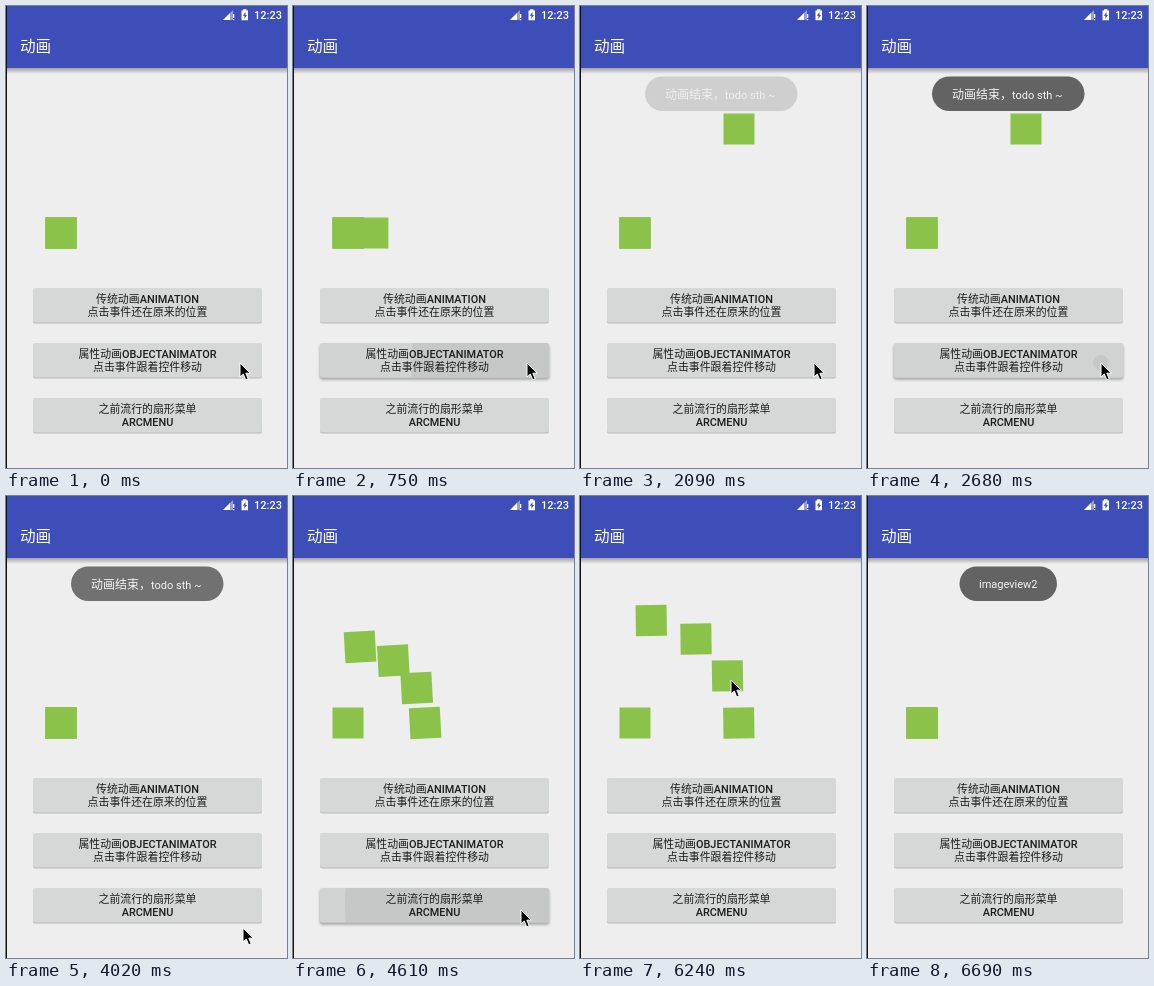
An HTML page for the animation above (7.47 s loop, 281 by 462 pixels).

```html
<!DOCTYPE html>
<html lang="zh">
<head>
<meta charset="utf-8">
<title>动画</title>
<style>
  html, body { margin: 0; width: 100%; height: 100%; overflow: hidden; background: #eee; }
  svg { display: block; width: 281px; height: 462px; }
  text { font-family: Roboto, "Noto Sans CJK SC", "Noto Sans CJK", sans-serif; }
  .label { font-size: 10.9px; text-anchor: middle; fill: #1c1c1c; }
  .label tspan { font-weight: 500; }
  .toast text { font-size: 12px; fill: #f4f4f4; }
  .toast tspan { font-size: 11px; }
  .toast rect { fill: #636363; }
  .item { fill: #8bc34a; }
</style>
</head>
<body>
<svg viewBox="0 0 281 462">
  <defs>
    <linearGradient id="barShadow" x2="0" y2="1">
      <stop stop-color="#000" stop-opacity=".32"/>
      <stop offset="1" stop-color="#000" stop-opacity="0"/>
    </linearGradient>
    <filter id="blur" x="-10%" y="-50%" width="120%" height="200%">
      <feGaussianBlur stdDeviation="1.4"/>
    </filter>
  </defs>
  <rect width="281" height="462" fill="#eee"/>
  <rect y="62" width="281" height="6" fill="url(#barShadow)"/>
  <rect width="281" height="62" fill="#3d4eb8"/>
  <g fill="#fff">
    <path d="M217 14L227 4V14Z" opacity=".45"/>
    <path d="M217 14L224 7V14ZM227 8h1.3v4H227ZM227 13h1.3v1.3H227Z"/>
    <path d="M235.500 4.500H237V3.200H240.500V4.500H242V14.300H235.500Z"/>
    <path d="M239.500 6L236.800 9.700H238.400V12.800L241 9H239.500Z" fill="#3d4eb8"/>
    <text x="248" y="13" font-size="11" font-weight="500">12:23</text>
    <text x="14" y="46" font-size="15.6">动画</text>
  </g>
  <g id="buttons"></g>
  <g id="items"></g>
  <g class="toast" id="endToast">
    <rect x="65" y="70.500" width="152.500" height="34.500" rx="17.250"/>
    <text x="85" y="92.500">动画结束，<tspan>todo sth ~</tspan></text>
  </g>
  <g class="toast" id="itemToast">
    <rect x="92.500" y="70.500" width="97.500" height="34.500" rx="17.250"/>
    <text x="141.250" y="92" text-anchor="middle"><tspan>imageview2</tspan></text>
  </g>
  <path id="cursor" d="M0 0V14L3.300 11L5.700 16.800L8.200 15.700L5.800 10.200H10.300Z"
        fill="#000" stroke="#fff" stroke-width="1"/>
  <rect width="1" height="462" fill="#111"/>
</svg>
<script>
const LOOP = 7470, TICK = 148.7;
const HOME = { x: 55, y: 227 }, RADIUS = 104;
const $ = id => document.getElementById(id);

const labels = [
  ['传统动画ANIMATION', '点击事件还在原来的位置'],
  ['属性动画OBJECTANIMATOR', '点击事件跟着控件移动'],
  ['之前流行的扇形菜单', 'ARCMENU']
];
const presses = [
  { button: 1, down: 440, up: 500, x: 234, y: 357 },
  { button: 1, down: 2660, up: 2940, x: 234, y: 357 },
  { button: 2, down: 4150, up: 4230, x: 228, y: 410 }
];
const cursorPath = [
  [0, 234, 357], [2960, 234, 357], [3500, 238, 446], [4015, 237, 432],
  [4230, 228, 414], [4620, 228, 414], [5200, 208, 333], [5640, 151, 184],
  [6100, 151, 184], [6680, 238, 470]
];

const styled = s => s.replace(/[A-Z]+/g, '<tspan>$&</tspan>');
$('buttons').innerHTML = labels.map(([top, bottom], i) => {
  const y = 282 + 55 * i;
  const box = `x="27" y="${y}" width="229" height="34.500" rx="2"`;
  return `<clipPath id="clip${i}"><rect ${box}/></clipPath>
    <rect class="lift" ${box} transform="translate(0 2)" filter="url(#blur)" opacity="0"/>
    <rect ${box} transform="translate(0 1)" fill="#b9baba"/>
    <rect ${box} fill="#d6d7d7"/>
    <g clip-path="url(#clip${i})">
      <rect class="tint" ${box} opacity="0"/>
      <circle class="ripple" opacity="0"/>
    </g>
    <text class="label" x="141.500" y="${y + 15}">${styled(top)}</text>
    <text class="label" x="141.500" y="${y + 28}">${styled(bottom)}</text>`;
}).join('');
$('items').innerHTML = '<rect class="item" x="-15.500" y="-15.500" width="31" height="31"/>'.repeat(5);

const all = name => [...document.querySelectorAll('.' + name)];
const lifts = all('lift'), tints = all('tint'), ripples = all('ripple'), items = all('item');

const span = (t, start, length) => Math.min(1, Math.max(0, (t - start) / length));
const ease = (t, start, length) => (1 - Math.cos(Math.PI * span(t, start, length))) / 2;

function place(node, x, y, turn = 0) {
  node.setAttribute('transform', `translate(${x} ${y}) rotate(${turn})`);
}

function drawItems(t) {
  const back = 1 - ease(t, 2900, 690);
  const right = ease(t, 519, 690) * back, up = ease(t, 1209, 690) * back;
  const open = ease(t, 4230, 575) - ease(t, 6080, 575);
  items.forEach((item, i) => {
    if (i === 0) return place(item, HOME.x, HOME.y);
    const angle = (i - 1) * Math.PI * 0.15;
    const slides = i === 1 ? RADIUS : 0;
    place(item,
      HOME.x + RADIUS * open * Math.cos(angle) + slides * right,
      HOME.y - RADIUS * open * Math.sin(angle) - slides * up,
      360 * open);
  });
}

function drawPresses(t) {
  [lifts, tints, ripples].flat().forEach(node => node.setAttribute('opacity', 0));
  for (const { button, down, up, x, y } of presses) {
    if (t < down || t > up + 750) continue;
    const fade = 1 - span(t, up + 400, 350);
    const ripple = ripples[button];
    lifts[button].setAttribute('opacity', 0.35 * fade);
    tints[button].setAttribute('opacity', 0.025 * fade);
    ripple.setAttribute('cx', x);
    ripple.setAttribute('cy', y);
    ripple.setAttribute('r', 8 + Math.max(0, t - up) * 0.443);
    ripple.setAttribute('opacity', 0.05 * fade);
  }
}

function drawCursor(t) {
  const next = cursorPath.findIndex(p => p[0] > t);
  const [t1, x1, y1] = cursorPath.at(next < 0 ? -1 : next);
  const [t0, x0, y0] = cursorPath.at(next < 0 ? -1 : next - 1);
  const k = t1 > t0 ? (t - t0) / (t1 - t0) : 1;
  place($('cursor'), x0 + (x1 - x0) * k, y0 + (y1 - y0) * k);
}

function draw(now) {
  const t = Math.floor((now % LOOP + 2) / TICK) * TICK;
  drawItems(t);
  drawPresses(t);
  drawCursor(t);
  $('endToast').setAttribute('opacity', span(t, 2000, 370) - span(t, 3980, 330));
  $('itemToast').setAttribute('opacity', span(t, 6110, 400));
}

const begin = performance.now();
function frame() {
  draw(performance.now() - begin);
  requestAnimationFrame(frame);
}
frame();
</script>
</body>
</html>
```
